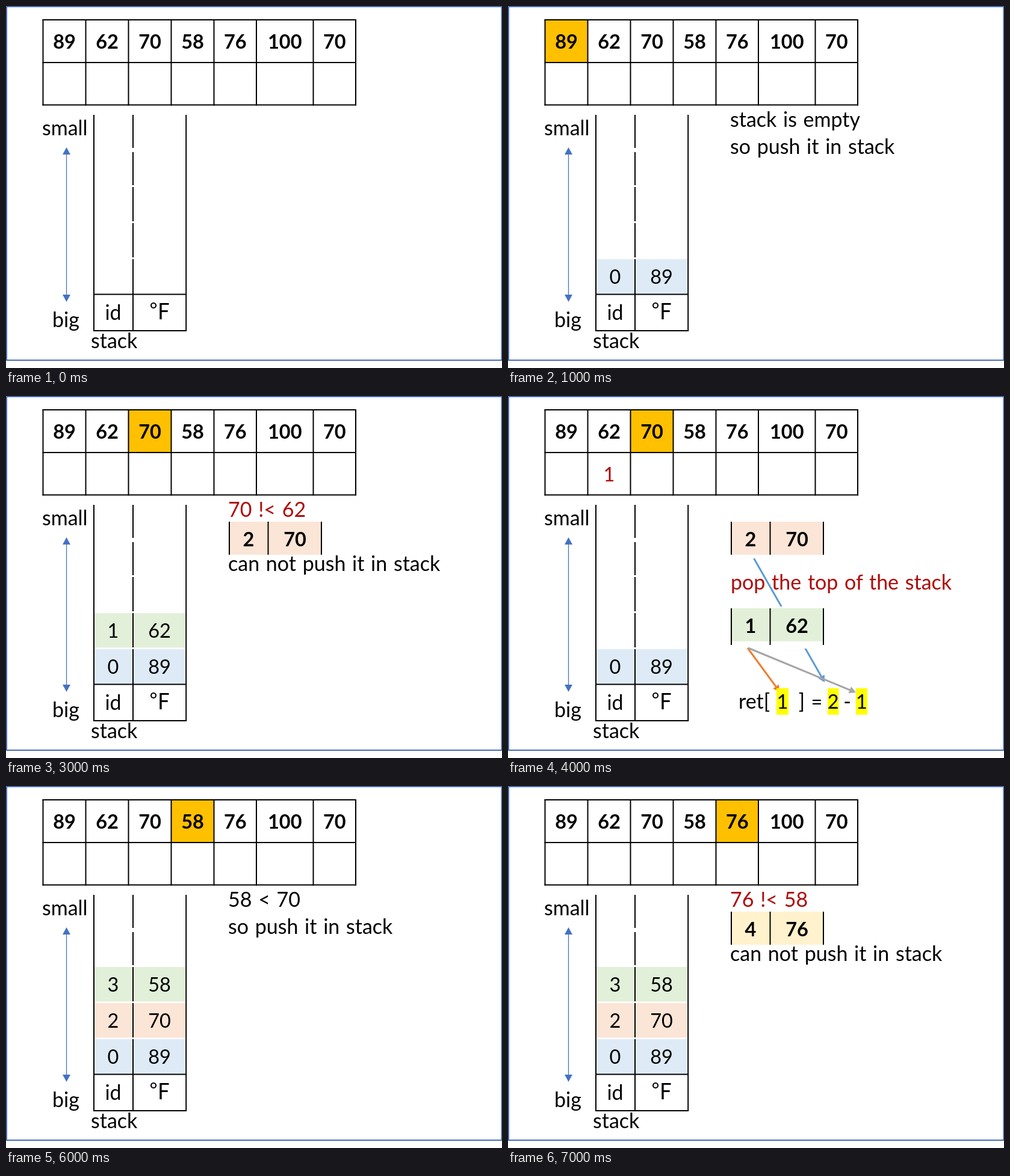
Recreate the animation shown at these times as an HTML page. Size 824 by 602 pixels, loop 8000 ms.

```html
<!DOCTYPE html>
<html lang="en">
<head>
<meta charset="utf-8">
<title>Monotonic stack</title>
<style>
html, body { margin: 0; width: 100%; height: 100%; overflow: hidden; background: #fff; }
svg { display: block; width: 824px; height: 602px; }
text { font-family: Lato, "Open Sans", sans-serif; font-size: 34px; word-spacing: 2px; white-space: pre; }
.num { font-size: 32.5px; }
.bold { font-weight: 700; }
.mid { text-anchor: middle; }
.deg { font-family: "Noto Sans CJK SC", "Noto Sans CJK JP", sans-serif; font-size: 36px; font-weight: 300; }
</style>
</head>
<body>
<svg id="stage" viewBox="0 0 824 602" xmlns="http://www.w3.org/2000/svg"></svg>
<script>
const RED = '#b00808', LINK = '#4472c4', GOLD = '#ffc000';
const BLUE = '#deebf7', GREEN = '#e2f0d9', PINK = '#fbe5d6', CREAM = '#fff2cc';
const temps = [89, 62, 70, 58, 76, 100, 70];
const cols = [61.5, 132.5, 203.5, 274.5, 345.5, 416, 510.5, 581];
const center = i => (cols[i] + cols[i + 1]) / 2;

const rect = (x, y, w, h, fill) =>
  `<rect x="${x}" y="${y}" width="${w}" height="${h}" fill="${fill}"/>`;
const line = (x1, y1, x2, y2, color = '#000', w = 2) =>
  `<line x1="${x1}" y1="${y1}" x2="${x2}" y2="${y2}" stroke="${color}" stroke-width="${w}"/>`;
const esc = s => String(s).replace(/</g, '&lt;');
const text = (s, x, y, cls = '', fill = '#000') =>
  `<text x="${x}" y="${y}" class="${cls}" fill="${fill}">${esc(s)}</text>`;

function arrow(x1, y1, x2, y2, color, w, len, half) {
  const d = Math.hypot(x2 - x1, y2 - y1), ux = (x2 - x1) / d, uy = (y2 - y1) / d;
  const bx = x2 - ux * len, by = y2 - uy * len;
  return line(x1, y1, bx, by, color, w) +
    `<polygon fill="${color}" points="${x2},${y2} ${bx - uy * half},${by + ux * half} ${bx + uy * half},${by - ux * half}"/>`;
}

// A loose stack entry
function card(x, y, id, fill, tail = 55) {
  return rect(x, y, 154, tail + 6, '#fff') + rect(x, y, 154, 55, fill) +
    [1, 65.5, 154].map(dx => line(x + dx, y, x + dx, y + tail)).join('') +
    text(id, x + 33, y + 41, 'num bold mid') + text(temps[id], x + 110, y + 41, 'num bold mid');
}

function table(active, answers) {
  let s = active >= 0 ? rect(cols[active], 23, cols[active + 1] - cols[active], 71, GOLD) : '';
  for (const x of cols) s += line(x, 22, x, 165.5);
  for (const y of [23, 94, 164.5]) s += line(60.5, y, 582, y);
  temps.forEach((t, i) => s += text(t, center(i), 71, 'num bold mid'));
  for (const i in answers) s += text(answers[i], center(+i), 142, 'num mid', RED);
  return s;
}

function stack(items) {
  let s = '';
  items.forEach(([id, fill], i) => {
    const y = 421 - 60 * i;
    s += rect(147, y, 151, 57.5, fill) +
      text(id, 178, y + 41, 'num mid') + text(temps[id], 255, y + 41, 'num mid');
  });
  s += line(146, 181, 146, 541) + line(299.2, 181, 299.2, 541);
  for (const [a, b] of [[181, 236], [243, 298], [301, 358], [361, 418], [421, 540]])
    s += line(211, a, 211, b);
  return s + line(145, 479.5, 300, 479.5) + line(145, 540, 300, 540) +
    text('id', 178, 522, 'mid') + text('\u2109', 255, 521, 'mid deg') + text('stack', 141, 569);
}

const frame = '<rect x="1" y="1" width="822.5" height="588" fill="none" stroke="#4a6fb5" stroke-width="2"/>' +
  text('small', 60, 215) + text('big', 77, 534) +
  arrow(100.5, 360, 100.5, 235, LINK, 1.3, 12, 6.5) +
  arrow(100.5, 360, 100.5, 492, LINK, 1.3, 12, 6.5);

const push = cond => text(cond, 369, 201) + text('so push it in stack', 369, 246);
const reject = (cond, id, fill) => text(cond, 369, 201, '', RED) +
  card(370, 209, id, fill) + text('can not push it in stack', 369, 291);

function popNote() {
  const marks = [[446, 20], [531, 18.5], [578, 19]];
  return text('pop the top of the stack', 370, 322, '', RED) +
    arrow(408.5, 270, 526, 476, '#5b9bd5', 3, 11, 6) +
    card(370, 209, 2, PINK) + rect(370, 350, 156, 66, '#fff') + card(370, 353, 1, GREEN, 61) +
    arrow(398, 419, 451.5, 492, '#ed7d31', 3, 11, 6) +
    arrow(399, 419, 578, 493, '#a5a5a5', 3, 11, 6) +
    marks.map(([x, w]) => rect(x, 486, w, 44, '#ffff00')).join('') +
    text('ret[', 383, 520) + text(']', 488, 520, 'mid') + text('=', 513, 520, 'num mid') +
    text('-', 563.5, 520, 'mid') +
    [1, 2, 1].map((n, i) => text(n, marks[i][0] + marks[i][1] / 2, 520, 'num mid')).join('');
}

const pushNote = () => text('70 < 89', 356, 221, '', RED) +
  card(344.5, 227, 2, PINK) + text('push it in stack', 356, 311);

const a = [0, BLUE], b = [1, GREEN], c = [2, PINK], d = [3, GREEN];
const scene = (active, items, note = '', answers = {}) =>
  frame + table(active, answers) + stack(items) + note;

// One scene per second
const scenes = [
  scene(-1, []),
  scene(0, [a], push('stack is empty')),
  scene(1, [a, b], push('62 < 89')),
  scene(2, [a, b], reject('70 !< 62', 2, PINK)),
  scene(2, [a], popNote(), { 1: 1 }),
  scene(2, [a, c], pushNote(), { 1: 1 }),
  scene(3, [a, c, d], push('58 < 70')),
  scene(4, [a, c, d], reject('76 !< 58', 4, CREAM))
];

const stage = document.getElementById('stage');
const start = performance.now();
let shown = -1;
function draw(now) {
  const i = Math.floor(Math.max(0, now - start) / 1000) % scenes.length;
  if (i !== shown) stage.innerHTML = scenes[shown = i];
  requestAnimationFrame(draw);
}
draw(start);
</script>
</body>
</html>
```
